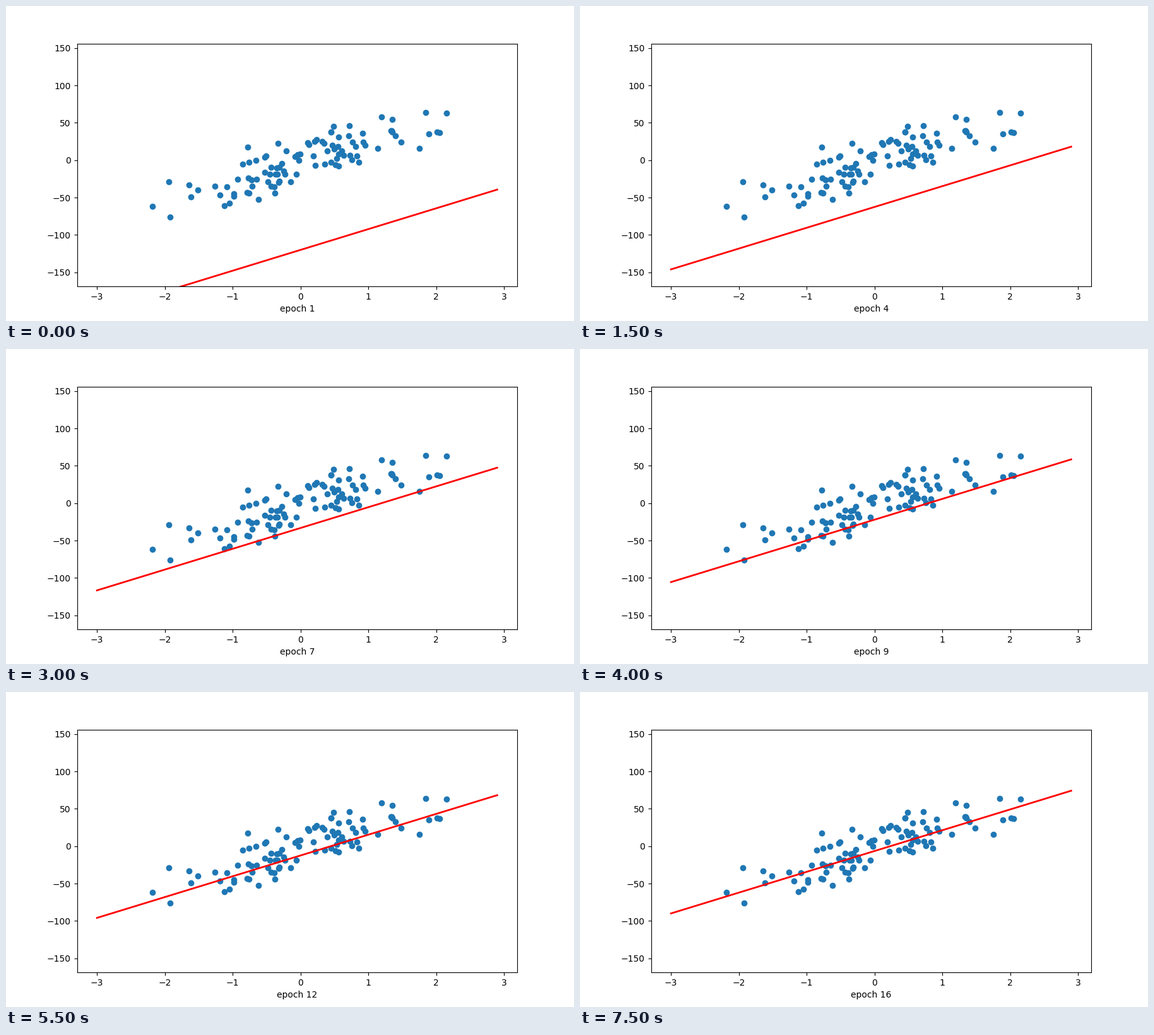
Animation of 900 by 500 pixels, one loop 8000 ms. Source, as a matplotlib script:

```python
import numpy as np
import matplotlib.pyplot as plt
from matplotlib.animation import FuncAnimation

EPOCHS = 16
SLOPE = 27.82
RATE = 0.001


def make_data(n=100, noise=20, seed=13):
    """Noisy samples around a line through the origin."""
    rng = np.random.RandomState(seed)
    x = rng.standard_normal(n)
    true_slope = 100 * rng.uniform()
    return x, true_slope * x + rng.normal(scale=noise, size=n)


def descend(x, y, b=-120.0):
    """Intercept at the start of each epoch of gradient descent."""
    path = []
    for _ in range(EPOCHS):
        path.append(b)
        b += 2 * RATE * np.sum(y - SLOPE * x - b)
    return path


x, y = make_data()
intercepts = descend(x, y)
grid = np.arange(-3, 3, 0.1)

fig, ax = plt.subplots(figsize=(9, 5), dpi=100)
ax.scatter(x, y)
line, = ax.plot(grid, SLOPE * grid + intercepts[0], "r-", linewidth=2)
ax.set_xlim(-3.295, 3.195)
ax.set_ylim(-168.75, 155.75)


def update(i):
    line.set_ydata(SLOPE * grid + intercepts[i])
    ax.set_xlabel(f"epoch {i + 1}")
    return line, ax


anim = FuncAnimation(fig, update, frames=EPOCHS, interval=500,
                     repeat=True, repeat_delay=0)
plt.show()
```
